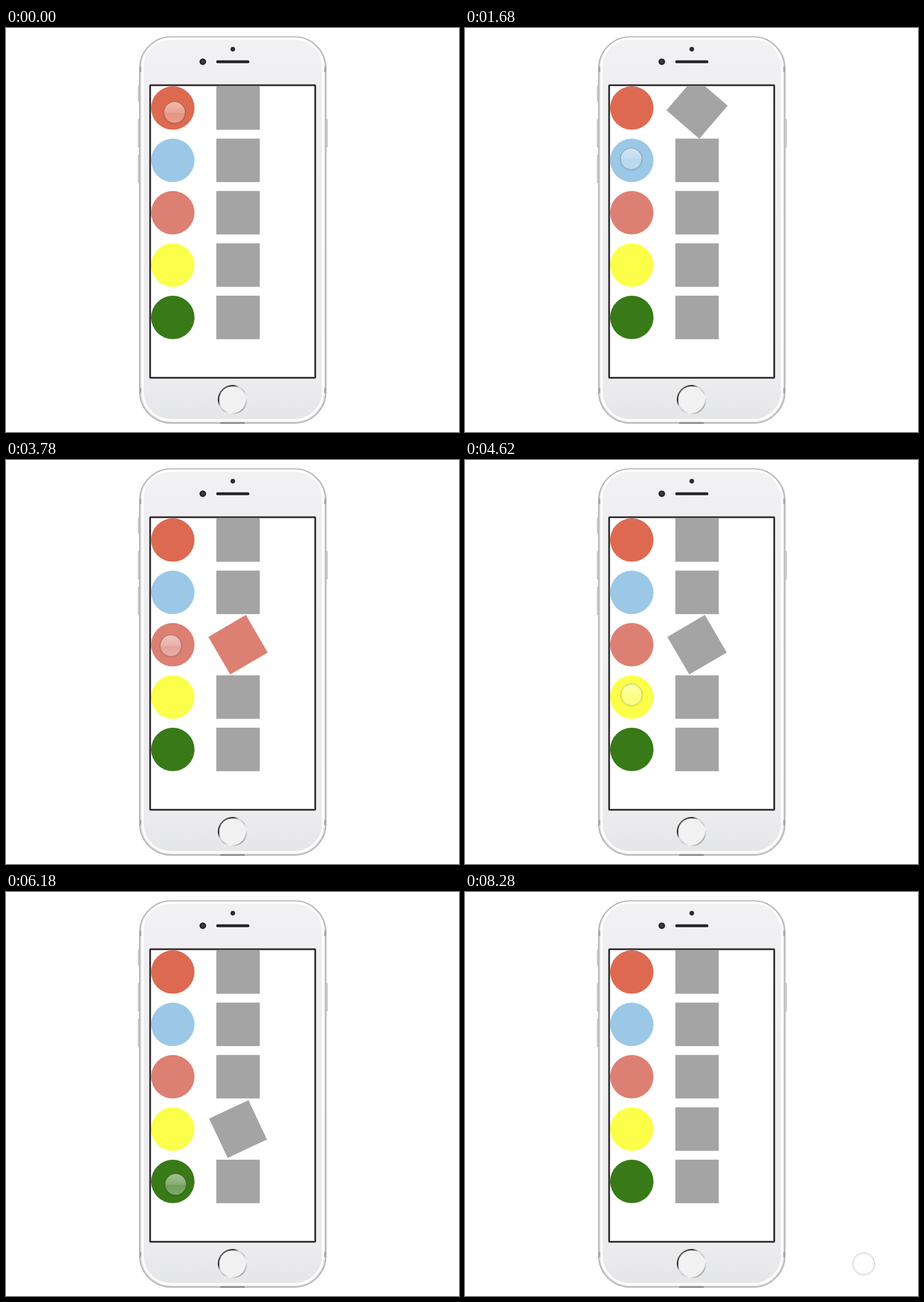
An HTML page for the animation above (8340 ms loop, 793 px wide and 706 px high).

```html
<!DOCTYPE html>
<html lang="en">
<head>
<meta charset="utf-8">
<title>Spinning squares</title>
<style>
  html, body { margin: 0; width: 100%; height: 100%; overflow: hidden; background: #fff; }
  svg { display: block; width: 100%; height: 100%; }
</style>
</head>
<body>
<svg viewBox="0 0 793 706" xmlns="http://www.w3.org/2000/svg">
  <defs>
    <linearGradient id="face" x1="0" y1="0" x2="0" y2="1">
      <stop offset="0" stop-color="#f2f2f4"/>
      <stop offset=".12" stop-color="#efeff1"/>
      <stop offset=".9" stop-color="#ececee"/>
      <stop offset="1" stop-color="#e5e6e8"/>
    </linearGradient>
    <linearGradient id="metal" x1="0" y1="0" x2="1" y2="1">
      <stop offset=".1" stop-color="#777"/>
      <stop offset=".26" stop-color="#222"/>
      <stop offset=".4" stop-color="#ddd"/>
      <stop offset=".55" stop-color="#c4c4c6"/>
      <stop offset=".7" stop-color="#f4f4f4"/>
      <stop offset=".9" stop-color="#999"/>
    </linearGradient>
    <linearGradient id="gloss" x1="0" y1="0" x2="0" y2="1">
      <stop offset="0" stop-color="#fff" stop-opacity=".55"/>
      <stop offset=".5" stop-color="#fff" stop-opacity=".38"/>
      <stop offset=".55" stop-color="#fff" stop-opacity=".28"/>
      <stop offset="1" stop-color="#fff" stop-opacity=".36"/>
    </linearGradient>
    <clipPath id="screen"><rect x="253.5" y="101" width="286.5" height="509"/></clipPath>
  </defs>

  <g fill="#e8e8e8" stroke="#aaa">
    <rect x="231.5" y="100.5" width="4" height="28" rx="1.5"/>
    <rect x="231.5" y="159.5" width="4" height="49" rx="1.5"/>
    <rect x="231.5" y="221.5" width="4" height="49" rx="1.5"/>
    <rect x="558.5" y="159.5" width="4" height="49" rx="1.5"/>
  </g>
  <rect x="234" y="15.5" width="326" height="675" rx="55" fill="#dededf" stroke="#b3b3b3" stroke-width="2"/>
  <g fill="#a9a9aa">
    <rect x="233" y="68" width="5" height="9"/><rect x="556" y="68" width="5" height="9"/>
    <rect x="233" y="629" width="5" height="9"/><rect x="556" y="629" width="5" height="9"/>
  </g>
  <rect x="375" y="689" width="43" height="2.5" fill="#858586"/>
  <rect x="239" y="18.5" width="316" height="667" rx="50" fill="url(#face)" stroke="#fff" stroke-width="4"/>

  <circle cx="397" cy="37" r="4" fill="#2b2b2d"/>
  <circle cx="344.5" cy="59" r="5.8" fill="#28282a"/>
  <circle cx="344.5" cy="59" r="2.2" fill="#47474e"/>
  <rect x="368" y="56.5" width="58" height="5" rx="2.5" fill="#252426"/>
  <circle cx="396.5" cy="649.5" r="24.5" fill="#f1f1f2" stroke="url(#metal)" stroke-width="2.6"/>

  <rect x="252.3" y="100" width="289" height="511.3" rx="1" fill="#fff" stroke="#2c272a" stroke-width="3"/>
  <g id="rows" clip-path="url(#screen)"></g>

  <g id="pointer">
    <circle cy="1" r="19.3" fill="none" stroke="#000" stroke-opacity=".09" stroke-width="2"/>
    <circle r="18.5" fill="url(#gloss)" stroke="#000" stroke-opacity=".17" stroke-width="1"/>
  </g>
</svg>
<script>
const LOOP = 8340, STEP = 60, SPIN = 500;
const GREY = '#a4a4a4', SIZE = 76, PITCH = 91.5;

// press: spin forward in colour; release: spin back in grey
const items = [
  { color: '#dd6a50', press: 660, release: 1299 },
  { color: '#9bc8e6', press: 1690, release: 2309 },
  { color: '#dc8073', press: 3636, release: 4264 },
  { color: '#fbff4a', press: 5200, release: 5830 },
  { color: '#397a18', press: 6600, release: 7220 }
];

// pointer rests: [arrival, departure, x, y]
const stops = [
  [0, 1300, 295, 147.5],
  [1640, 2760, 291, 228.5],
  [3240, 4264, 288.5, 324.5],
  [4600, 5840, 291.5, 410],
  [6140, 7640, 297, 511],
  [8200, LOOP, 698, 649.5]
];

const clamp = u => Math.min(1, Math.max(0, u));
const ease = u => u < .5 ? 2 * u * u : 1 - 2 * (1 - u) ** 2;

function add(parent, name, attrs) {
  const node = document.createElementNS('http://www.w3.org/2000/svg', name);
  for (const key in attrs) node.setAttribute(key, attrs[key]);
  return parent.appendChild(node);
}

const rows = document.getElementById('rows');
const pointer = document.getElementById('pointer');

items.forEach((item, i) => {
  item.y = 139.8 + i * PITCH;
  add(rows, 'circle', { cx: 292, cy: item.y, r: SIZE / 2, fill: item.color });
  item.square = add(rows, 'rect', {
    x: 406.2 - SIZE / 2, y: item.y - SIZE / 2, width: SIZE, height: SIZE
  });
});

function pointerAt(t) {
  let i = stops.length - 1;
  while (t < stops[i][0]) i--;
  const [, leave, x, y] = stops[i];
  if (t <= leave || i === stops.length - 1) return [x, y];
  const [arrive, , nx, ny] = stops[i + 1];
  const k = ease((t - leave) / (arrive - leave));
  return [x + (nx - x) * k, y + (ny - y) * k];
}

function draw(t) {
  for (const { square, color, press, release, y } of items) {
    const turn = ease(clamp((t - press) / SPIN)) - ease(clamp((t - release) / SPIN));
    square.setAttribute('fill', t >= press && t < release ? color : GREY);
    square.setAttribute('transform', `rotate(${360 * turn} 406.2 ${y})`);
  }
  pointer.setAttribute('transform', `translate(${pointerAt(t)})`);
}

const start = performance.now();
function tick() {
  const t = (performance.now() - start) % LOOP;
  draw(Math.floor(t / STEP) * STEP);
  requestAnimationFrame(tick);
}
draw(0);
requestAnimationFrame(tick);
</script>
</body>
</html>
```
